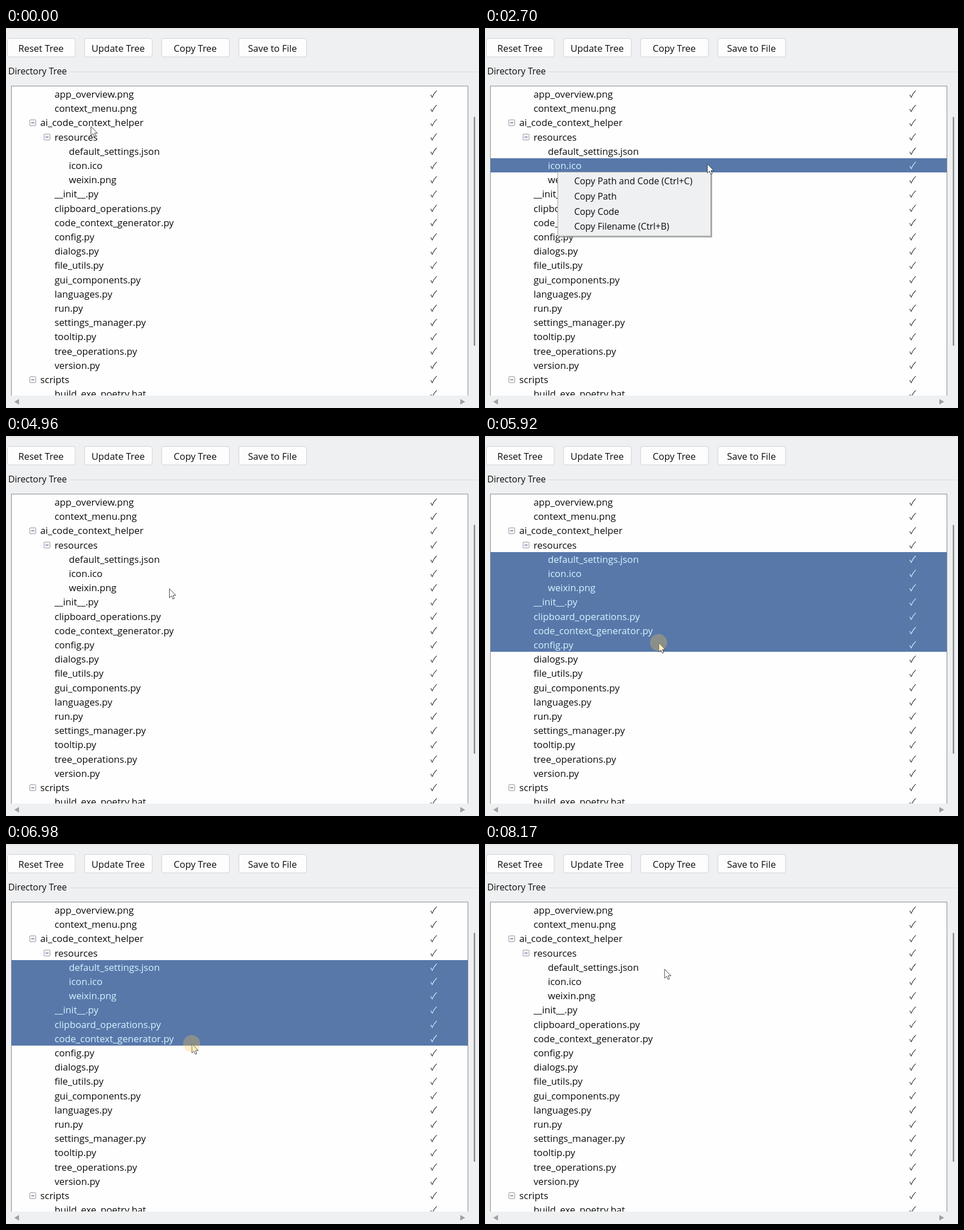
Animation of 835 by 671 pixels, one loop 8.22 s. Source, as an HTML page:

```html
<!DOCTYPE html>
<html lang="en">
<head>
<meta charset="utf-8">
<title>Directory tree</title>
<style>
html, body { margin: 0; width: 835px; height: 671px; overflow: hidden; background: #eff0f2; }
svg { display: block; }
text { font: 16.75px "Open Sans", "Noto Sans", sans-serif; fill: #0c0c0c; }
.button { fill: #fdfdfd; stroke: #d0d1d3; }
.buttons text { font-size: 16.5px; }
.label { font-size: 15.8px; }
.menu text { font-size: 15.9px; }
.menu .shadow { fill: #8c8c8c; opacity: .75; }
.menu .panel { fill: #eff0f2; stroke: #a3a4a6; }
.check { fill: none; stroke: #333; stroke-width: 1.15; }
.box { fill: #fafafa; stroke: #929497; }
.bar { fill: none; shape-rendering: crispEdges; }
.selected .bar { fill: #5878aa; }
.selected text { fill: #d6f4ff; }
.selected .check { stroke: #d6f4ff; }
</style>
</head>
<body>
<svg width="835" height="671" viewBox="0 0 835 671">
  <clipPath id="view"><rect x="10" y="103" width="805" height="546"/></clipPath>
  <path d="M0 1.5H835M112 77.5H835" stroke="#d9dadc"/>
  <g id="buttons" class="buttons"></g>
  <text class="label" x="4" y="82">Directory Tree</text>
  <rect x="10" y="103" width="805" height="546" fill="#fefefe"/>
  <g id="rows" clip-path="url(#view)"></g>
  <path d="M9.5 649V102.5H815.5V649" fill="none" stroke="#85888c"/>
  <path d="M827 158V560" stroke="#85868a" stroke-width="2.4" stroke-linecap="round"/>
  <path d="M23 655V665L14.5 660ZM802 655V665L810.5 660Z" fill="#9fa0a2"/>
  <g id="menus"></g>
  <g id="pointer">
    <path d="M.5 .5V16.5L4.2 13.2 6.7 18.8 9.2 17.7 6.8 12.2H11.8Z" fill="#fff" stroke="#2c3038" stroke-width=".9" stroke-linejoin="round"/>
    <circle id="press" r="15" fill="#ffc84a" fill-opacity=".3"/>
  </g>
</svg>
<script>
const LOOP = 8220, ROW = 25.2, TOP = 104, MENU_ROW = 26.6;
const $ = id => document.getElementById(id);

const buttons = ["Reset Tree", "Update Tree", "Copy Tree", "Save to File"];
$("buttons").innerHTML = buttons.map((label, i) => {
  const x = 2.5 + i * 136.2;
  return `<rect class="button" x="${x}" y="18.5" width="119.5" height="32.5" rx="3.5"/>
    <text x="${x + 59.2}" y="41.5" text-anchor="middle">${label}</text>`;
}).join("");

// Leading ">" marks depth, "-" an expanded folder.
const entries = `>app_overview.png
>context_menu.png
-ai_code_context_helper
>-resources
>>default_settings.json
>>icon.ico
>>weixin.png
>__init__.py
>clipboard_operations.py
>code_context_generator.py
>config.py
>dialogs.py
>file_utils.py
>gui_components.py
>languages.py
>run.py
>settings_manager.py
>tooltip.py
>tree_operations.py
>version.py
-scripts
>build_exe_poetry.bat`.split("\n");

$("rows").innerHTML = entries.map((entry, i) => {
  const [, depth, folder, name] = entry.match(/^(>*)(-?)(.*)/);
  const x = 60.5 + depth.length * ROW;
  const expander = folder && `<rect class="box" x="${x - 18.5}" y="7.7" width="10.5" height="10.5" rx="1"/>
    <path d="M${x - 16} 13h5.5" stroke="#4a5c94" stroke-width="1.2"/>`;
  return `<g transform="translate(0 ${TOP + i * ROW})">
    <rect class="bar" x="10" width="805" height="${ROW}"/>${expander}
    <text x="${x}" y="19">${name}</text>
    <path class="check" d="M749.8 13.8L752.4 18.4Q755.2 11.5 760.4 6.7"/></g>`;
}).join("");
const rows = [...$("rows").children];

function addMenu(x, y, items) {
  let center = 16.8, body = "";
  for (const item of items) {
    body += item
      ? `<text x="29.5" y="${center + 5.5}">${item}</text>`
      : `<path d="M4 ${center - 9.3}H266" stroke="#98999b"/>`;
    center += item ? MENU_ROW : 11.2;
  }
  const size = `width="270" height="${center - 10.4}"`;
  $("menus").innerHTML += `<g class="menu" transform="translate(${x} ${y})">
    <rect class="shadow" x="3" y="3" ${size}/><rect class="panel" x=".5" y=".5" ${size}/>${body}</g>`;
}
const copyItems = ["Copy Path and Code (Ctrl+C)", "Copy Path", "Copy Code", "Copy Filename (Ctrl+B)"];
addMenu(150, 174, ["Open in Explorer (Ctrl+F)", "Open Command Line (Ctrl+T)", "", "Expand All", ...copyItems]);
addMenu(128, 254, copyItems);
const [folderMenu, fileMenu] = $("menus").children;

const smooth = u => u * u * (3 - 2 * u);
const easeOut = u => 1 - (1 - u) ** 3;

// Each move runs from the last resting place to a new one, bowed sideways.
const start = [149.5, 173.5];
const moves = [
  { from: 920, until: 1760, to: [128, 254], bow: [-9.6, 89] },
  { from: 2430, until: 3180, to: [485, 243], bow: [0, -7], ease: easeOut },
  { from: 4340, until: 5060, to: [290.5, 214], bow: [-30, 128] },
  { from: 5190, until: 5350, to: [298, 214] },
  { from: 5530, until: 6350, to: [316, 506], bow: [0, 15] },
  { from: 6420, until: 7270, to: [326, 289], bow: [5, 6] },
  { from: 7300, until: 8120, to: [316.5, 220.5], bow: [0, -8] }
];
function pointerAt(t) {
  let place = start;
  for (const { from, until, to, bow = [0, 0], ease = smooth } of moves) {
    if (t < from) break;
    const u = Math.min(1, (t - from) / (until - from));
    place = place.map((p, k) => p + (to[k] - p) * ease(u) + bow[k] * Math.sin(Math.PI * u));
  }
  return place;
}

const between = (t, from, until) => t >= from && t < until;
const show = (el, on) => el.setAttribute("visibility", on ? "visible" : "hidden");

function draw() {
  const t = performance.now() % LOOP, [x, y] = pointerAt(t);
  const dragging = between(t, 5580, 8100);
  let first = -1, last = -1;
  if (between(t, 150, 2040)) first = last = 2;
  else if (between(t, 2040, 4160)) first = last = 5;
  else if (dragging) [first, last] = [4, Math.floor((y - TOP) / ROW)];

  rows.forEach((row, i) => row.classList.toggle("selected", i >= first && i <= last));
  show(folderMenu, between(t, 200, 2000));
  show(fileMenu, between(t, 2100, 4110));
  show($("press"), dragging || between(t, 100, 240) || between(t, 1990, 2100) || between(t, 4000, 4220));
  $("pointer").setAttribute("transform", `translate(${x} ${y})`);
  requestAnimationFrame(draw);
}
draw();
</script>
</body>
</html>
```
